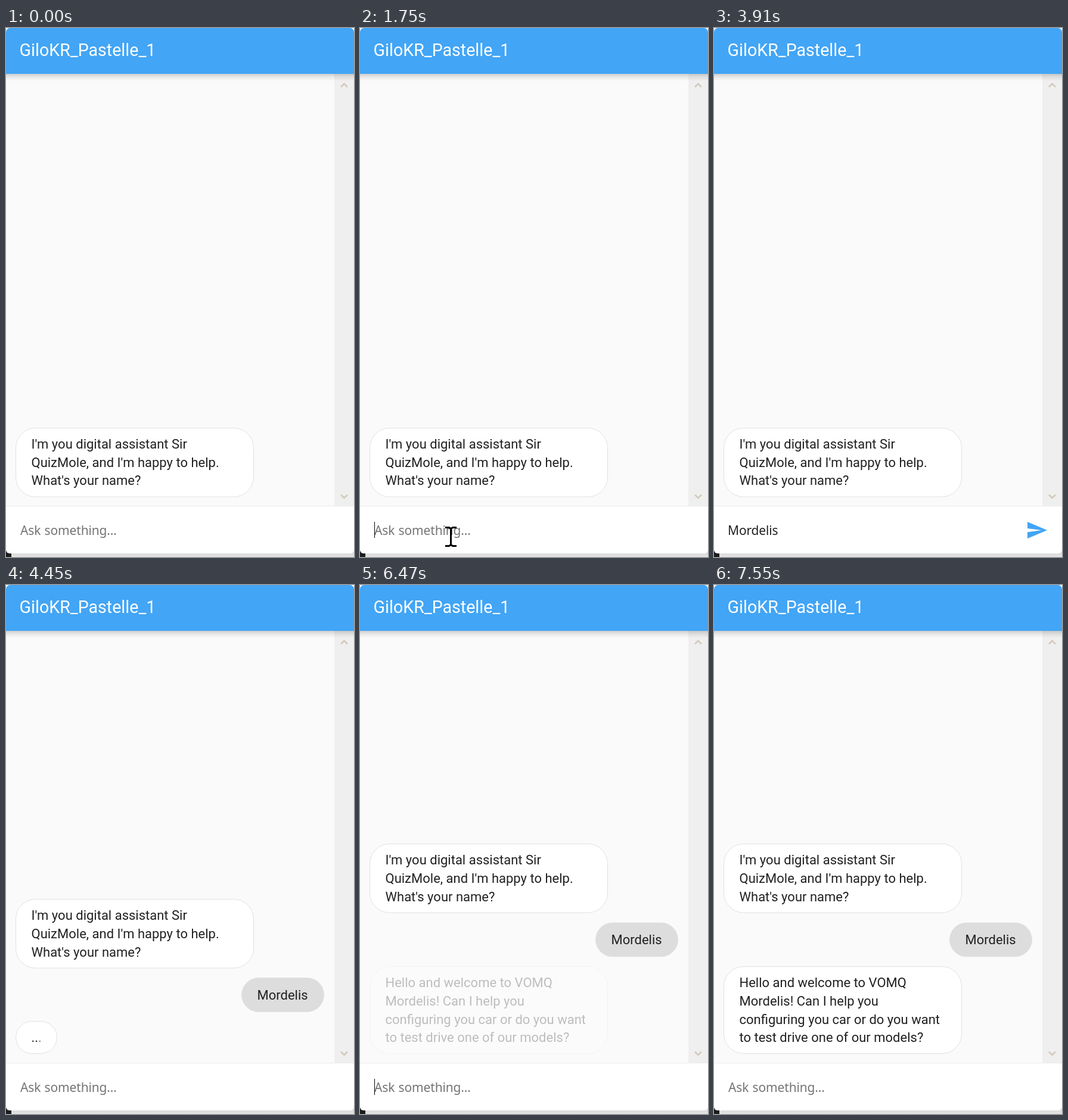
Animation, 584 px wide and 888 px high, one loop 8 s. Source, as an HTML page:

```html
<!DOCTYPE html>
<html lang="en">
<head>
<meta charset="utf-8">
<title>Chat assistant</title>
<style>
  html, body { margin: 0; width: 100%; height: 100%; overflow: hidden; background: #fff; }
  svg { display: block; width: 584px; height: 888px; }
  text { font: 22px Roboto, sans-serif; fill: #212121; white-space: pre; }
  .title { font-size: 28.6px; fill: #fff; }
  .field { font: 21px "Noto Sans", "Open Sans", sans-serif; letter-spacing: -.15px; word-spacing: 1px; }
  .hint { fill: #757575; }
  .bubble { fill: #fff; stroke: #e0e0e0; }
  .reply { fill: #ddd; stroke: #e0e0e0; }
  .chevron { fill: none; stroke: #d3cabb; stroke-width: 2.6; }

  /* One loop is 8 s, so 1% is 80 ms. */
  .greet, .last-line, .user, .caret, .hint { animation: 8s step-end infinite; }
  .greet { animation-name: greet; }
  .last-line { animation-name: settle; }
  .user { animation-name: user; }
  .caret { animation-name: caret; }
  .hint { animation-name: hint; }
  .sent { animation: sent 8s linear infinite; }
  .waiting { animation: waiting 8s linear infinite; }
  .answer { animation: answer 8s linear infinite; }
  .send { fill: #42a5f5; animation: send 8s linear infinite; }
  .pointer { animation: glide 8s linear infinite, pointer 8s step-end infinite; }
  .dot { animation: dot 1s linear infinite; }
  .dot:nth-of-type(2) { animation-delay: 40ms; }
  .dot:nth-of-type(3) { animation-delay: 80ms; fill-opacity: .6; }

  @keyframes greet {
    0% { transform: translateY(0); }
    49.875% { transform: translateY(-144px); }
    78.875%, 100% { transform: translateY(-237px); }
  }
  @keyframes settle {
    0% { transform: translateY(-1px); }
    49.875%, 100% { transform: none; }
  }
  @keyframes user {
    0% { transform: none; }
    78.875%, 100% { transform: translateY(-92.6px); }
  }
  @keyframes sent {
    0%, 50.4% { opacity: 0; }
    54.6%, 100% { opacity: 1; }
  }
  @keyframes waiting {
    0%, 50.4% { opacity: 0; }
    54.6%, 78.87% { opacity: 1; }
    78.875%, 100% { opacity: 0; }
  }
  @keyframes answer {
    0%, 79.85% { opacity: 0; }
    83.6%, 100% { opacity: 1; }
  }
  @keyframes dot {
    0%, 5%, 78%, 100% { opacity: .15; }
    22%, 61% { opacity: 1; }
  }
  @keyframes caret {
    0% { opacity: 0; }
    21.875% { opacity: 1; }
    28.75% { opacity: 0; }
    34.5% { opacity: 1; }
    48.875% { opacity: 0; }
    49.875% { opacity: 1; }
    55.625% { opacity: 0; }
    61.5% { opacity: 1; }
    68.375% { opacity: 0; }
    74.75% { opacity: 1; }
    81.875% { opacity: 0; }
    87.75% { opacity: 1; }
    94.375%, 100% { opacity: 0; }
  }
  @keyframes hint {
    0% { opacity: 1; }
    34.5% { opacity: 0; }
    49.875%, 100% { opacity: 1; }
  }
  @keyframes send {
    0%, 34.5% { opacity: 0; }
    37%, 49.87% { opacity: 1; }
    52%, 100% { opacity: 0; }
  }
  @keyframes glide {
    0%, 5.375% { transform: translate(55px, 36px); animation-timing-function: ease-out; }
    10.25%, 100% { transform: none; }
  }
  @keyframes pointer {
    0% { opacity: 0; }
    5.375% { opacity: 1; }
    22.875% { opacity: .5; }
    23.75%, 100% { opacity: 0; }
  }
</style>
</head>
<body>
<svg viewBox="0 0 584 888">
  <defs>
    <linearGradient id="shade" x2="0" y2="1">
      <stop offset="0" stop-opacity=".17"/>
      <stop offset=".45" stop-opacity=".07"/>
      <stop offset="1" stop-opacity="0"/>
    </linearGradient>
    <linearGradient id="ground" x2="0" y2="1">
      <stop offset="0" stop-color="#cfcfcf"/>
      <stop offset="1" stop-color="#e4e4e4"/>
    </linearGradient>
  </defs>

  <!-- page behind the card -->
  <rect y="874" width="584" height="14" fill="url(#ground)"/>
  <rect y="874" width="9" height="14" fill="#1c1c1c"/>

  <!-- card -->
  <path d="M0 77H584V876a6 6 0 0 1-6 6H6a6 6 0 0 1-6-6z" fill="#fff"/>
  <rect y="77" width="584" height="725" fill="#fafafa"/>
  <rect x="551" y="77" width="33" height="725" fill="#efefef"/>
  <path class="chevron" d="M562 99l5.5-5.5 5.5 5.5M562 783.5l5.5 5.5 5.5-5.5"/>
  <rect y="802" width="584" height="1" fill="#ebebeb"/>

  <!-- thread -->
  <g class="greet">
    <rect class="bubble" x="16.5" y="671.5" width="399" height="115.5" rx="33"/>
    <text x="42.5" y="706">I'm you digital assistant Sir</text>
    <text x="42.5" y="737">QuizMole, and I'm happy to help.</text>
    <text class="last-line" x="42.5" y="768">What's your name?</text>
  </g>
  <g class="user">
    <g class="sent">
      <rect class="reply" x="395.5" y="659.5" width="138" height="57" rx="28.5"/>
      <text x="421.5" y="696">Mordelis</text>
    </g>
  </g>
  <g class="waiting">
    <rect class="bubble" x="16.5" y="732.5" width="69" height="54" rx="27"/>
    <text class="dot" x="42.5" y="767">.</text>
    <text class="dot" x="48.3" y="767">.</text>
    <text class="dot" x="54.1" y="767">.</text>
  </g>
  <g class="answer">
    <rect class="bubble" x="16.5" y="640.5" width="399" height="146" rx="33"/>
    <text x="42.5" y="675">Hello and welcome to VOMQ</text>
    <text x="42.5" y="706">Mordelis! Can I help you</text>
    <text x="42.5" y="737">configuring you car or do you want</text>
    <text x="42.5" y="767">to test drive one of our models?</text>
  </g>

  <!-- header -->
  <rect y="77" width="584" height="12" fill="url(#shade)"/>
  <path d="M0 77V7a7 7 0 0 1 7-7H577a7 7 0 0 1 7 7V77z" fill="#42a5f5"/>
  <text class="title" x="22.5" y="47">GiloKR_Pastelle_1</text>

  <!-- input -->
  <text class="field hint" x="24" y="851">Ask something...</text>
  <text class="field" id="typed" x="23" y="851"></text>
  <rect class="caret" id="caret" x="24" y="829" width="1" height="27" fill="#000"/>
  <path class="send" transform="translate(522.9 824.3) scale(1.57 1.56)" d="M2 21L23 12 2 3v7l15 2-15 2z"/>
  <path class="pointer" fill="none" stroke="#000" stroke-width="3"
        d="M143 838.5h6.5l3 2 3-2h6.5M143 869.5h6.5l3-2 3 2h6.5M152.5 840v28"/>
</svg>
<script>
  const LOOP = 8000, SUBMIT = 3990;
  const name = "Mordelis";
  const keyTimes = [2760, 2920, 3140, 3300, 3380, 3450, 3600, 3680];
  const typed = document.getElementById("typed");
  const caret = document.getElementById("caret");
  let start, shown = 0;

  function draw(now) {
    start ??= now;
    const t = (now - start) % LOOP;
    const count = t < SUBMIT ? keyTimes.filter(k => k <= t).length : 0;
    if (count !== shown) {
      shown = count;
      typed.textContent = name.slice(0, count);
      caret.setAttribute("x", count ? Math.round(23 + typed.getComputedTextLength()) : 24);
    }
    requestAnimationFrame(draw);
  }
  requestAnimationFrame(draw);
</script>
</body>
</html>
```
